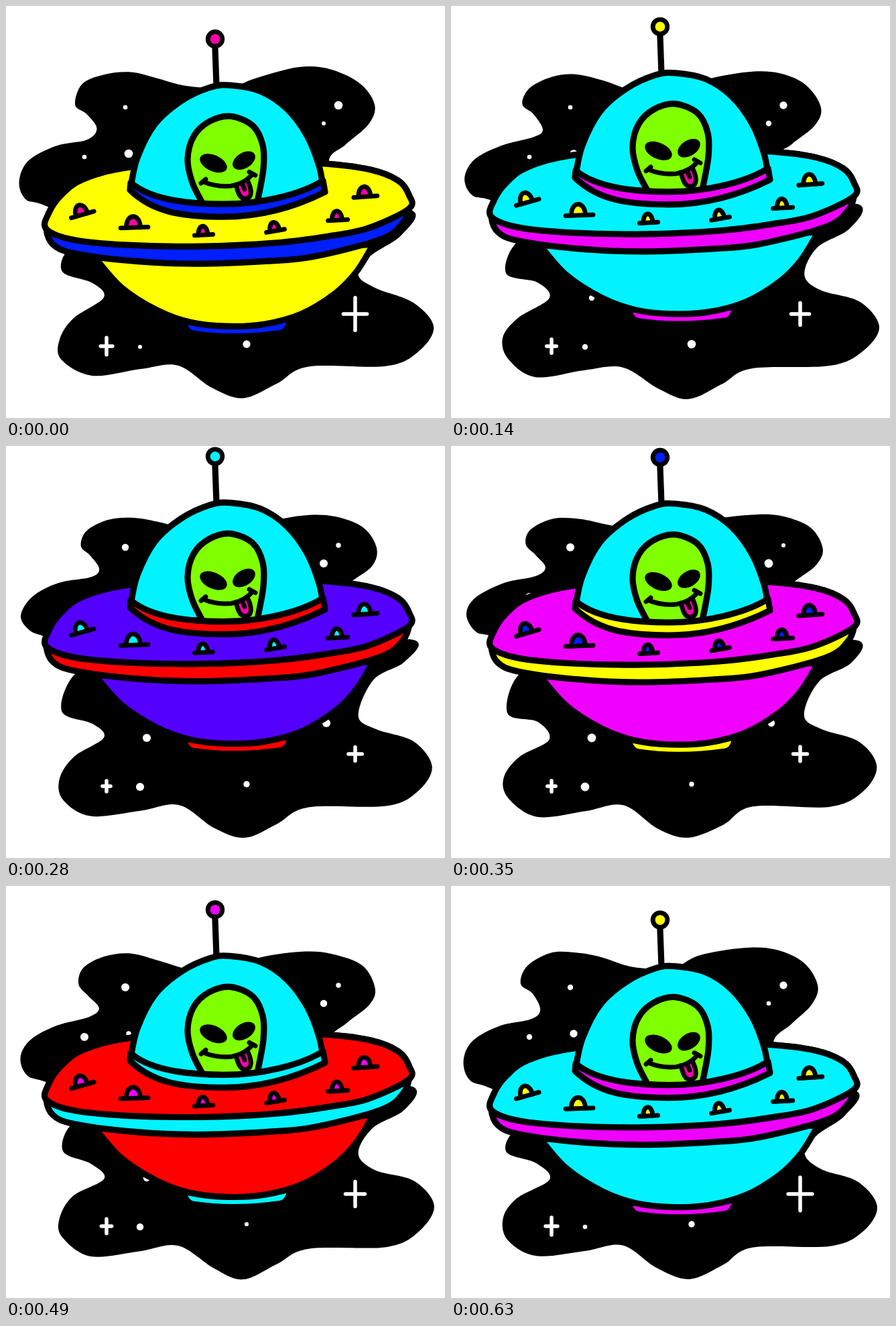
These frames come from a looping animation (655x614 px, 0.7 s). An HTML page:

```html
<!DOCTYPE html>
<html lang="en">
<head>
<meta charset="utf-8">
<title>Flying saucer</title>
<style>
html, body { margin: 0; width: 100%; height: 100%; overflow: hidden; background: #fff; }
svg { display: block; width: 655px; height: 614px; }
.ink { stroke: #000; stroke-width: 9.2; stroke-linecap: round; stroke-linejoin: round; }
.fine { stroke-width: 6.8; }
.line { fill: none; }
</style>
</head>
<body>
<svg viewBox="0 0 655 614">
  <path id="cloud"/>
  <g id="stars" fill="#fff" stroke-linecap="round"></g>
  <g id="ship">
    <path class="ink band" d="M265 470Q267 488 280 490Q340 499 410 489Q423 486 424 465Z"/>
    <path class="ink body" id="hull"/>
    <path class="ink band" id="rim"/>
    <path class="ink body" id="disc"/>
    <path class="ink line" d="M312 65L314 120"/>
    <path class="ink" id="glass" fill="#00f3ff"/>
    <path class="ink" id="head" fill="#80ff00"/>
    <ellipse rx="21.5" ry="12" transform="translate(309.5 236)rotate(24)"/>
    <ellipse rx="18.5" ry="11.5" transform="translate(355 232)rotate(-32)"/>
    <path class="ink fine" fill="#ff00a8" d="M343 268C346 280 349 289 357 289C368 288 367 276 361 263"/>
    <path class="ink fine line" d="M295 264Q314 272 336 270Q357 266 368 252M291 266L298 260M363 249L372 254M353 268L356 275"/>
    <path class="ink band" d="M186 265C215 290 270 297 325 297S440 283 473 262L476 279C440 297 390 316 325 316S218 308 185 276Z"/>
    <g id="lamps"></g>
    <circle class="ink fine lamp" cx="312" cy="51" r="10.8"/>
  </g>
</svg>
<script>
const STEP = 70, STEPS = 10;
const ring = ["#ff0", "#80ff00", "#00f3ff", "#001eff", "#5400ff", "#ef00ff", "#ff00a8", "#f00"];

const cloud = points(`60,300 30,288 18,262 32,232 73,210 120,198 135,183 120,162 104,145 114,118
  147,101 185,98 225,107 270,120 330,122 372,105 437,92 485,96 528,115 549,150 539,179 507,206
  482,234 500,300 604,305 590,341 543,372 527,401 552,422 608,441 637,477 615,514 567,536 450,539
  405,564 355,585 309,570 258,537 200,543 128,552 84,526 79,495 100,464 146,436 128,413 84,397
  95,364 150,340`);
const discTop = points("60,334 64,310 82,284 115,260 185,242 330,230 478,237 545,246 585,262 601,283");
const discEdge = points("601,304 540,333 480,345 400,355 290,360 180,358 100,350");
const rimEdge = points("602,300 593,324 560,349 460,375 390,382 280,386 180,381 100,370 70,357");

// x, y and the step at which the star is largest
const dots = points(`178,151,6 496,148,0.5 474,175,5 117,225,6 183,220,0.5
  200,508,5 359,504,1.5 210,435,5 478,413,3`);
// x, y, radius, tilt
const lamps = points("113,313,9,-16 190,332,10.5,-2 294,343,7,-3 401,337,7,-10 494,321,7.5,-3 535,286,9,-4");

const byId = id => document.getElementById(id);
const draw = (id, d) => byId(id).setAttribute("d", d);
const wave = (step, peak) => Math.cos((step - peak) / STEPS * 2 * Math.PI);

function points(text) {
  return text.trim().split(/\s+/).map(p => p.split(",").map(Number));
}

// smooth curve through a list of points
function curve(list, closed) {
  const n = list.length;
  const at = i => list[closed ? (i + n) % n : Math.max(0, Math.min(n - 1, i))];
  let d = "M" + list[0];
  for (let i = 0; i < (closed ? n : n - 1); i++) {
    const [a, b, c, e] = [at(i - 1), at(i), at(i + 1), at(i + 2)];
    const out = b.map((v, k) => v + (c[k] - a[k]) / 6);
    const into = c.map((v, k) => v - (e[k] - b[k]) / 6);
    d += `C${out} ${into} ${c}`;
  }
  return d + (closed ? "Z" : "");
}

// repeatable noise from -1 to 1
function noise(seed) {
  const v = Math.sin(seed * 127.1) * 43758.5453;
  return 2 * (v - Math.floor(v)) - 1;
}

// the upper cloud squeezes together as the ship rises
function cloudAt(step, rise) {
  return cloud.map(([x, y], i) => {
    const pull = y < 390 ? rise : 0;
    return [
      x + 6 * pull + 2 * noise(i + 60 * step),
      y + 0.12 * (175 - y) * pull + 2 * noise(i + 60 * step + 900)
    ];
  });
}

function spark(x, y, w, h) {
  return `<path d="M${x - w} ${y}h${2 * w}M${x} ${y - h}v${2 * h}" stroke="#fff" stroke-width="5.5"/>`;
}

function starsAt(step, rise) {
  return dots.map(([x, y, peak]) =>
    `<circle cx="${x}" cy="${y}" r="${4.7 + 1.7 * wave(step, peak)}"/>`).join("")
    + spark(150, 507, 9 - 3 * rise, 13 - 5 * rise)
    + spark(521, 459, 18 - 8 * rise, 25 - 15 * rise);
}

function drawStep(step) {
  const lift = -17.9 - 17.8 * wave(step, 4.3), rise = lift / -36;
  const hue = step < 8 ? step : step - 7;
  draw("cloud", curve(cloudAt(step, rise), true));
  byId("stars").innerHTML = starsAt(step, rise);
  byId("ship").setAttribute("transform", `translate(0 ${lift})`);
  ["body", "band", "lamp"].forEach((name, i) => {
    const color = ring[(hue + 3 * i) % ring.length];
    document.querySelectorAll("." + name).forEach(el => el.setAttribute("fill", color));
  });
}

draw("rim", curve(discTop.concat(rimEdge), true));
draw("disc", curve(discTop.concat(discEdge), true));
draw("hull", curve(points("133,377 172,421 225,455 275,473 330,479 385,476 440,461 490,431 522,399 545,362")));
draw("head", curve(points("294,297 278,265 271,230 280,196 303,174 335,166 368,180 383,209 384,245 375,294")));
draw("glass", curve(points(`186,272 196,228 222,178 262,143 305,123 335,120 380,129 419,155
  449,195 467,240 474,277`)) + "C440 300 218 308 186 272");
byId("lamps").innerHTML = lamps.map(([x, y, r, tilt]) => {
  const top = -1.33 * (r + 6);
  return `<g class="ink fine" transform="translate(${x} ${y})rotate(${tilt})">
    <path class="lamp" d="M${-r} 0C${-r} ${top} ${r} ${top} ${r} 0"/>
    <path d="M${-1.8 * r} 0H${2.1 * r}"/></g>`;
}).join("");

let shown = -1;
function tick() {
  const step = Math.floor(performance.now() / STEP) % STEPS;
  if (step !== shown) drawStep(shown = step);
  requestAnimationFrame(tick);
}
tick();
</script>
</body>
</html>
```
